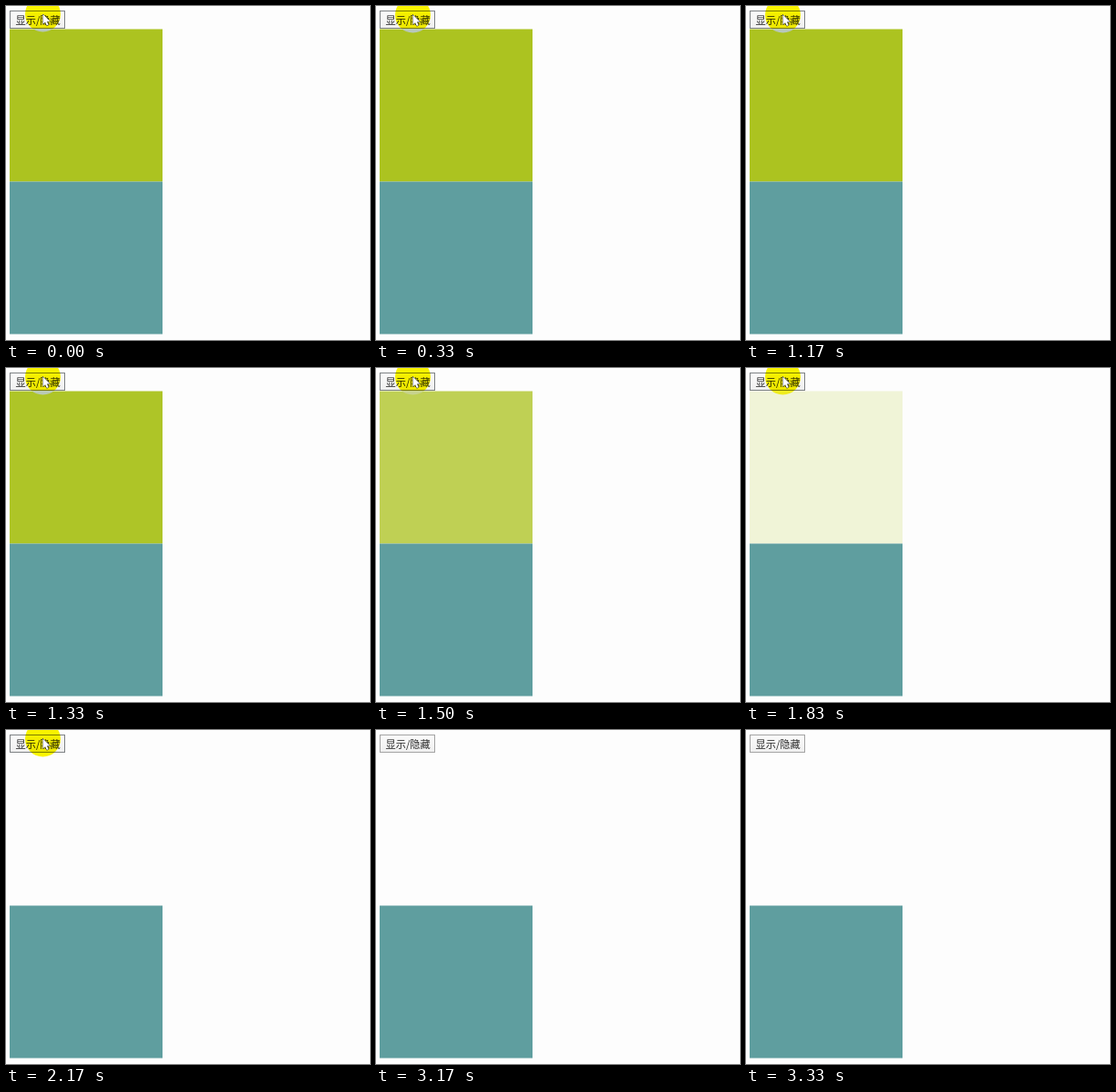
Animation of 400x368 px, one loop 3.99 s. Source, as an HTML page with a canvas:

```html
<!DOCTYPE html>
<html lang="zh">
<head>
<meta charset="utf-8">
<style>
  html, body { margin: 0; width: 100%; height: 100%; overflow: hidden; background: #fdfdfd; }
  canvas { display: block; }
</style>
</head>
<body>
<canvas id="stage" width="400" height="368"></canvas>
<script>
const ctx = document.getElementById('stage').getContext('2d');
const LOOP = 3990;
const STEPS = [0, 330, 1170, 1330, 1500, 1670, 1830, 2000, 2170, 3170];
const FADE_START = 1233, FADE_LENGTH = 820;

function rect(color, x, y, w, h) {
  ctx.fillStyle = color;
  ctx.fillRect(x, y, w, h);
}

function mix(a, b, k) {
  return `rgb(${a.map((v, i) => Math.round(v + (b[i] - v) * k))})`;
}

// Swing easing, from fully visible to hidden
function boxOpacity(t) {
  const p = Math.min(1, Math.max(0, (t - FADE_START) / FADE_LENGTH));
  return 0.5 + Math.cos(p * Math.PI) / 2;
}

function drawButton(active) {
  const fill = ctx.createLinearGradient(0, 5, 0, 25);
  fill.addColorStop(0, '#fbfbfb');
  fill.addColorStop(1, '#efefef');
  rect(fill, 4, 5, 61, 20);
  ctx.strokeStyle = active ? '#7d8184' : '#a3a3a3';
  ctx.lineWidth = 1;
  ctx.strokeRect(4.5, 5.5, 60, 19);
  ctx.fillStyle = '#2b2b2b';
  ctx.font = '11.2px "Noto Sans CJK SC", "Noto Sans CJK", sans-serif';
  ctx.fillText('显示/隐藏', 10.5, 20);
}

function drawHalo(x, y, opacity) {
  const layer = (color, top, height, blend) => {
    ctx.save();
    ctx.beginPath();
    ctx.rect(0, top, 80, height);
    ctx.clip();
    ctx.globalCompositeOperation = blend;
    ctx.fillStyle = color;
    ctx.beginPath();
    ctx.arc(x, y, 19.5, 0, Math.PI * 2);
    ctx.fill();
    ctx.restore();
  };
  layer('#fbf500', 0, 25, 'multiply');
  layer(mix([251, 245, 0], [184, 200, 188], opacity), 25, 10, 'source-over');
}

function drawPointer(x, y) {
  ctx.save();
  ctx.translate(x, y);
  ctx.fillStyle = '#fff';
  ctx.strokeStyle = '#222';
  ctx.lineJoin = 'round';
  ctx.stroke(pointer);
  ctx.fill(pointer);
  ctx.restore();
}

const pointer = new Path2D('M0 0V11L2.6 8.7L4.3 12.6L6.2 11.8L4.5 8H8Z');

function draw(time) {
  const t = STEPS.filter(step => step <= time).pop();
  const opacity = boxOpacity(t);
  rect('#fdfdfd', 0, 0, 400, 368);
  ctx.globalAlpha = opacity;
  rect('#acc320', 4, 25.5, 168, 168);
  ctx.globalAlpha = 1;
  rect('#5f9e9f', 4, 193.5, 168, 168);
  drawButton(t < 3170);
  if (t < 3170) {
    const drop = t < 330 ? 0 : 1;
    drawHalo(40.5, 9 + drop, opacity);
    drawPointer(40.5, 9 + drop * 0.5);
  }
}

function frame() {
  draw(performance.now() % LOOP);
  requestAnimationFrame(frame);
}
frame();
</script>
</body>
</html>
```
